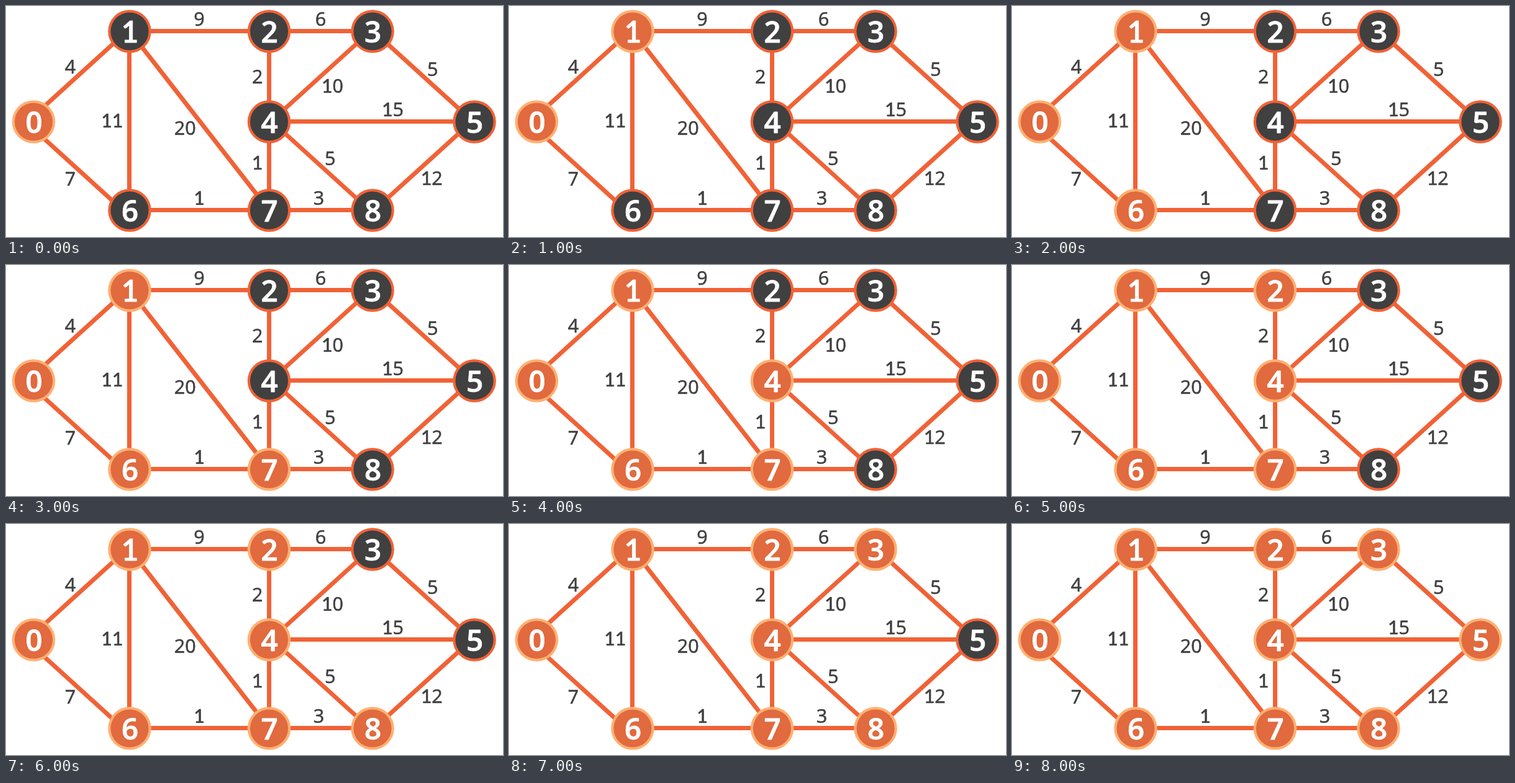
These frames come from a looping animation (800 px wide and 373 px high, 9 s). An HTML page with a canvas:

```html
<!DOCTYPE html>
<html lang="en">
<head>
<meta charset="utf-8">
<title>Graph traversal</title>
<style>
  html, body { margin: 0; width: 100%; height: 100%; overflow: hidden; background: #fff; }
  canvas { display: block; width: 800px; height: 373px; }
</style>
</head>
<body>
<canvas id="stage" width="800" height="373"></canvas>
<script>
const ctx = document.getElementById('stage').getContext('2d');
const STEP = 1000;
const SLOPE = 0.91;
const ORANGE = '#f16236', DARK = '#404040', FILL = '#e16a3f', RING = '#ffb072';

// Nodes sit on a grid of five columns and three rows.
const cols = [44.5, 199, 423.5, 590, 754], rows = [41, 187, 330];
const nodes = ['01', '10', '20', '30', '21', '41', '12', '22', '32']
  .map(([c, r]) => ({ x: cols[c], y: rows[r] }));
const order = [...'016742835'].map(Number);

// link: two nodes; side: label left (1) or right (-1) of the direction;
// slide: label shift along the edge; shift: vertical offset of the edge
const edges = [
  { link: '01', weight: 4, side: 1, slide: -7, shift: -6 },
  { link: '06', weight: 7, side: -1, slide: -7, shift: 11 },
  { link: '12', weight: 9, side: 1 },
  { link: '16', weight: 11, side: -1 },
  { link: '17', weight: 20, side: -1, slide: -5 },
  { link: '67', weight: 1, side: 1 },
  { link: '23', weight: 6, side: 1 },
  { link: '24', weight: 2, side: -1 },
  { link: '47', weight: 1, side: -1, slide: -5 },
  { link: '43', weight: 10, side: -1, slide: 4 },
  { link: '45', weight: 15, side: 1, slide: 34 },
  { link: '48', weight: 5, side: 1, slide: 3 },
  { link: '78', weight: 3, side: 1, slide: -3 },
  { link: '35', weight: 5, side: 1, slide: 3 },
  { link: '85', weight: 12, side: -1, slide: -3 }
];

// The figure 1 needs a foot, so it takes another face.
function fontFor(ch, size, weight) {
  const face = ch === '1' ? 'Lato, "Open Sans"' : '"Open Sans", Lato';
  return `${weight} ${size}px ${face}, sans-serif`;
}

function drawNumber(value, x, y, size, weight, color) {
  const text = String(value), advance = size * 0.572;
  ctx.fillStyle = ctx.strokeStyle = color;
  ctx.lineWidth = size * 0.02;
  ctx.lineJoin = 'round';
  ctx.textAlign = 'center';
  ctx.textBaseline = 'alphabetic';
  [...text].forEach((ch, i) => {
    const cx = x + (i - (text.length - 1) / 2) * advance;
    ctx.font = fontFor(ch, size, weight);
    ctx.fillText(ch, cx, y + size * 0.357);
    ctx.strokeText(ch, cx, y + size * 0.357);
  });
}

const snap = v => Math.ceil(v) - 0.5;

function drawEdge({ link, weight, side, slide = 0, shift = 0 }) {
  const [a, b] = [...link].map(i => nodes[i]);
  const midX = (snap(a.x) + snap(b.x)) / 2;
  const midY = (snap(a.y) + snap(b.y)) / 2 + shift;
  const dx = b.x - a.x;
  let dy = b.y - a.y;
  // Flat diagonals all share one slope.
  if (Math.abs(dy) < dx) dy = Math.sign(dy) * dx * SLOPE;

  ctx.strokeStyle = ORANGE;
  ctx.lineWidth = 7;
  ctx.beginPath();
  ctx.moveTo(midX - dx / 2, midY - dy / 2);
  ctx.lineTo(midX + dx / 2, midY + dy / 2);
  ctx.stroke();

  // Keep the label a fixed gap away from the line.
  const len = Math.hypot(dx, dy), ux = dx / len, uy = dy / len;
  const halfWidth = 8.8 * String(weight).length;
  const away = side * (10 + Math.hypot(uy * halfWidth, ux * 9.5));
  drawNumber(weight, midX + ux * slide + uy * away,
    midY + uy * slide - ux * away + 0.5, 30.5, 400, DARK);
}

function disc(x, y, r, color) {
  ctx.fillStyle = color;
  ctx.beginPath();
  ctx.arc(x, y, r, 0, Math.PI * 2);
  ctx.fill();
}

function drawNode(i, visited) {
  const { x, y } = nodes[i];
  disc(x, y, 34.8, visited ? RING : ORANGE);
  disc(x, y, 30.6, visited ? FILL : DARK);
  drawNumber(i, x + 0.5, y + 0.7, 47.5, 600, '#fff');
}

function draw(time) {
  const step = Math.floor(time / STEP) % order.length;
  ctx.fillStyle = '#fff';
  ctx.fillRect(0, 0, 800, 373);
  edges.forEach(drawEdge);
  order.forEach((node, rank) => drawNode(node, rank <= step));
}

const start = performance.now();
function tick() {
  draw(performance.now() - start);
  requestAnimationFrame(tick);
}
tick();
</script>
</body>
</html>
```
